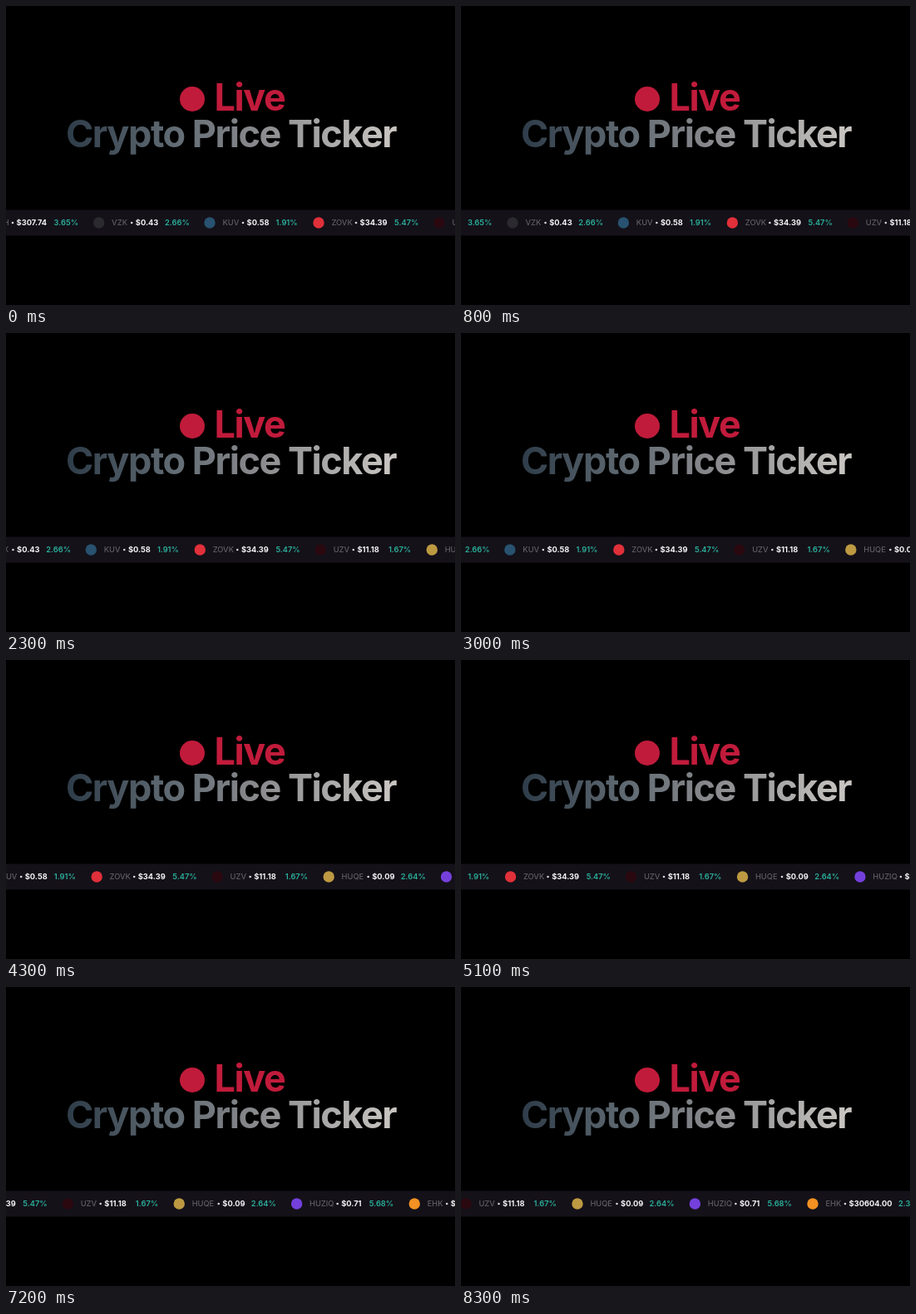
Write an HTML page that moves like this. It is 540 px wide and 360 px high and loops after 8400 ms.

```html
<!DOCTYPE html>
<html lang="en">
<head>
<meta charset="utf-8">
<title>Price ticker</title>
<style>
  html, body { margin: 0; width: 100%; height: 100%; overflow: hidden; background: #000; }
  svg { display: block; width: 100%; height: 100%; font-family: Inter, sans-serif; }
  .title { font-size: 45px; font-weight: 700; letter-spacing: -1.45px; }
  .ticker { font-size: 9.3px; }
  .symbol { fill: #5f5e63; font-weight: 500; }
  .price { fill: #f4f4f6; font-weight: 700; }
  .change { fill: #2bb09b; font-weight: 600; }
</style>
</head>
<body>
<svg viewBox="0 0 540 360">
  <defs>
    <linearGradient id="steel" gradientUnits="userSpaceOnUse" x1="73" y1="0" x2="470" y2="0">
      <stop offset="0" stop-color="#2e3c49"/>
      <stop offset=".33" stop-color="#626c74"/>
      <stop offset=".55" stop-color="#85868a"/>
      <stop offset="1" stop-color="#cac7c3"/>
    </linearGradient>
  </defs>
  <rect width="540" height="360"/>
  <g class="title">
    <circle cx="224" cy="112" r="15" fill="#c11b3b"/>
    <text x="250.6" y="125.7" fill="#c11b3b">Live</text>
    <text x="270.6" y="169.6" text-anchor="middle" fill="url(#steel)">Crypto Price Ticker</text>
  </g>
  <rect y="245.5" width="540" height="31" fill="#141119"/>
  <g class="ticker" id="ticker"></g>
</svg>
<script>
const LOOP = 8400, STEP = 100, SPEED = 0.06205; // ms, ms, px per ms
const CENTER_Y = 261, BASELINE = 264.3;

// icon x, colour, symbol, price, change, price offset, change offset
const coins = [
  [-31.5, '#c9a02c', 'QEH', '$307.74', '3.65%', 44.5, 89.5],
  [111.7, '#2b2b2f', 'VZK', '$0.43', '2.66%', 44.5, 79.7],
  [245, '#28526f', 'KUV', '$0.58', '1.91%', 45, 80],
  [376, '#e0303a', 'ZOVK', '$34.39', '5.47%', 50, 91.5],
  [521, '#2a0810', 'UZV', '$11.18', '1.67%', 44.5, 82],
  [655, '#bd9a42', 'HUQE', '$0.09', '2.64%', 52.5, 87],
  [796.4, '#7440dc', 'HUZIQ', '$0.71', '5.68%', 54, 87.5],
  [938, '#f39122', 'EHK', '$30604.00', '2.31%', 44, 103.5]
];

const ticker = document.getElementById('ticker');

function add(tag, attributes, content = '') {
  const node = document.createElementNS(ticker.namespaceURI, tag);
  for (const name in attributes) node.setAttribute(name, attributes[name]);
  node.textContent = content;
  ticker.append(node);
}

const label = (name, x, content) => add('text', { class: name, x, y: BASELINE }, content);
const disc = (cx, r, fill) => add('circle', { cx, cy: CENTER_Y, r, fill });

for (const [x, color, symbol, price, change, priceX, changeX] of coins) {
  disc(x, 6.7, color);
  label('symbol', x + 15.4, symbol);
  disc(x + priceX - 5, 1.3, '#d8d8dc');
  label('price', x + priceX - 0.4, price);
  label('change', x + changeX - 0.4, change);
}

function draw() {
  const time = Math.floor(performance.now() % LOOP / STEP) * STEP;
  ticker.setAttribute('transform', `translate(${-SPEED * time} 0)`);
  requestAnimationFrame(draw);
}
draw();
</script>
</body>
</html>
```
